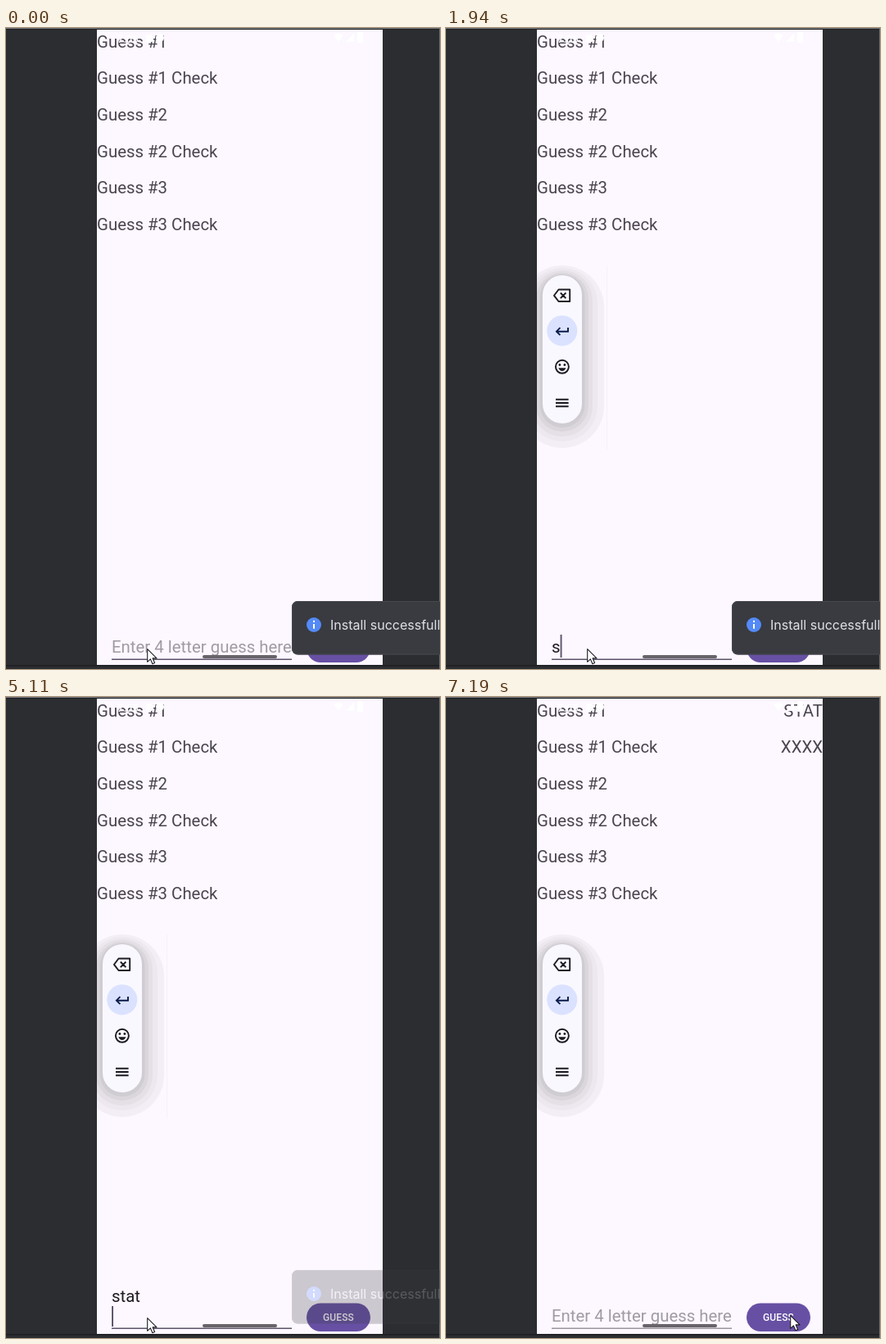
Animation of 530 by 783 pixels, one loop 8000 ms. Source, as an HTML page:

```html
<!DOCTYPE html>
<html lang="en">
<head>
<meta charset="utf-8">
<title>Guessing game</title>
<style>
  html, body { margin: 0; width: 100%; height: 100%; overflow: hidden; background: #2b2d30; }
  svg { display: block; width: 530px; height: 783px; }
  text { font-family: Roboto, sans-serif; font-size: 20.4px; white-space: pre; }
  .label { fill: #49454f; }
  .end { text-anchor: end; }
  .line { fill: none; stroke-width: 1.9; stroke: #1b1b21; }

  /* Every change is a hard cut on one 8 s clock. */
  .anim { animation: 8s step-end infinite; }

  #toolbar { opacity: 0; animation-name: toolbar; }
  @keyframes toolbar {
    5.125% { opacity: .3; transform: translateY(10px); }
    6.75% { opacity: .6; transform: translateY(5px); }
    8.625% { opacity: .85; transform: translateY(2px); }
    10.125%, 100% { opacity: 1; transform: none; }
  }

  #seam { opacity: 0; animation-name: seam; }
  @keyframes seam { 10.125% { opacity: 1; } 82.875% { opacity: 0; } }

  #hint { animation-name: hint; }
  @keyframes hint { 24.25% { opacity: 0; } 82.875% { opacity: 1; } }

  #typed { animation-name: wrap; }
  @keyframes wrap { 51.5% { transform: translateY(-24px); } 65.625% { transform: none; } }

  .key { fill-opacity: 0; }
  #k1 { animation-name: key1; }
  #k2 { animation-name: key2; }
  #k3 { animation-name: key3; }
  @keyframes key1 { 24.25% { fill-opacity: 1; } 82.875% { fill-opacity: 0; } }
  @keyframes key2 { 25.875% { fill-opacity: 1; } 82.875% { fill-opacity: 0; } }
  @keyframes key3 { 29.75% { fill-opacity: 1; } 82.875% { fill-opacity: 0; } }

  #caret { opacity: 0; y: 741px; height: 28px; animation-name: caret; }
  @keyframes caret {
    5.125% { opacity: 1; }
    8.625% { opacity: 0; }
    15.5% { opacity: 1; }
    22.375% { opacity: 0; }
    24.25% { opacity: 1; transform: translateX(10.5px); }
    25.875% { transform: translateX(17px); }
    29.75% { transform: translateX(35px); }
    37% { opacity: 0; }
    42.5% { opacity: 1; }
    48.25% { opacity: 0; }
    51.5% { opacity: 1; transform: none; y: 744px; height: 25px; }
    58.5% { opacity: 0; }
    63.875% { opacity: 1; }
    65.625% { transform: translateX(35px); y: 741px; height: 28px; }
    71.125% { opacity: 0; }
    77.625% { opacity: 1; }
    82.875% { opacity: 0; }
  }

  #underline { stroke: #5b5468; stroke-width: 1.6; animation-name: underline; }
  @keyframes underline { 82.875% { stroke: #99959d; } }

  #notice { animation-name: notice; }
  @keyframes notice { 63.875% { opacity: .25; } 65.625%, 100% { opacity: 0; } }

  #result { opacity: 0; animation-name: result; }
  @keyframes result { 82.875%, 100% { opacity: 1; } }

  #button { fill: #6750a4; animation-name: press; }
  @keyframes press { 82.875% { fill: #7864af; } 89.875% { fill: #6750a4; } }

  #pointer { transform: translate(172px, 758px); animation-name: pointer; }
  @keyframes pointer {
    71.125% { transform: translate(330px, 750px); }
    72.75% { transform: translate(445px, 737px); }
    74.25% { transform: translate(465px, 747px); }
    75.75% { transform: translate(454px, 749px); }
    77.625% { transform: translate(429px, 755px); }
    79.5%, 100% { transform: translate(420px, 755px); }
  }
</style>
</head>
<body>
<svg viewBox="0 0 530 783">
  <defs>
    <clipPath id="screen"><rect x="111" y="2" width="349" height="776"/></clipPath>
  </defs>

  <rect width="530" height="783" fill="#2b2d30"/>
  <rect width="530" height="1" fill="#77787b"/>
  <rect y="1" width="530" height="1" fill="#1e1f22"/>
  <rect y="778" width="530" height="1.5" fill="#1e1f22"/>
  <rect x="529" width="1" height="783" fill="#66686c"/>
  <rect x="111" y="2" width="349" height="776" fill="#fdf7ff"/>

  <g clip-path="url(#screen)">
    <g class="label">
      <text x="111" y="23.6">Guess #1</text>
      <text x="111" y="68.2">Guess #1 Check</text>
      <text x="111" y="112.9">Guess #2</text>
      <text x="111" y="157.5">Guess #2 Check</text>
      <text x="111" y="202.2">Guess #3</text>
      <text x="111" y="246.8">Guess #3 Check</text>
    </g>
    <g id="result" class="label end anim">
      <text x="460" y="23.6">STAT</text>
      <text x="460" y="68.2">XXXX</text>
    </g>

    <!-- status bar -->
    <g fill="#fff">
      <text x="136" y="17.5" style="font-size:13px;font-weight:500">7:05</text>
      <rect x="171" y="8" width="9" height="9" rx="2"/>
      <circle cx="188" cy="12" r="5"/>
      <path d="M400 9q6-5 12 0l-6 8zM415 17l10-11v11z"/>
      <rect x="429" y="5" width="7" height="13" rx="1.5"/>
    </g>

    <path id="seam" class="anim" d="M196.5 290V515" stroke="#f6f0f8"/>

    <g id="toolbar" class="anim">
      <rect x="91" y="290" width="102" height="223" rx="51" fill="#f3eef5"/>
      <rect x="99" y="293" width="86" height="212" rx="43" fill="#ede8ef"/>
      <rect x="105" y="296" width="74" height="203" rx="37" fill="#e4e0e6"/>
      <rect x="110" y="299" width="64" height="194" rx="32" fill="#dad6dc"/>
      <rect x="114.500" y="301" width="55" height="187" rx="27.500" fill="#cfccd2"/>
      <rect x="118" y="302" width="48" height="181" rx="24" fill="#faf8ff"/>
      <path class="line" stroke-linejoin="round" d="M137.500 319.500H151.200V334H137.500L132 326.800zM139.800 323.500l6.600 6.600m0-6.600l-6.600 6.600"/>
      <circle cx="141.800" cy="369.800" r="18.600" fill="#dae2ff"/>
      <path class="line" style="stroke:#0b1b4a" d="M149 366v4.700H135m4.400-4.500l-4.500 4.500 4.500 4.500"/>
      <circle class="line" cx="141.900" cy="413.800" r="8"/>
      <g fill="#1b1b21">
        <circle cx="138.900" cy="411.500" r="1.400"/>
        <circle cx="144.900" cy="411.500" r="1.400"/>
        <path d="M137.300 415.300h9.200q-1.400 3.700-4.600 3.700t-4.600-3.700z"/>
      </g>
      <path class="line" d="M134 453.700h15.600M134 458h15.600M134 462.300h15.600"/>
    </g>

    <text id="hint" class="anim" x="129" y="763.200" fill="#9f9ba3">Enter 4 letter guess here</text>
    <text id="typed" class="anim" x="129" y="763.200" fill="#1d1b20"><tspan id="k1" class="key anim">s</tspan><tspan id="k2" class="key anim">t</tspan><tspan id="k3" class="key anim">at</tspan></text>
    <path id="underline" class="anim" d="M129 771.200H349"/>
    <rect id="caret" class="anim" x="129.200" width="1.800" fill="#4e4860"/>

    <rect id="button" class="anim" x="367" y="740.500" width="78" height="34.500" rx="17.250"/>
    <text x="406" y="762.300" fill="#fff" text-anchor="middle" style="font-size:12px;font-weight:500;letter-spacing:.1px">GUESS</text>
    <rect x="240" y="766" width="91" height="4" rx="2" fill="#68646b"/>
  </g>

  <g id="notice" class="anim">
    <rect x="349" y="700" width="200" height="65.500" rx="7" fill="#393b40"/>
    <rect x="349.500" y="700.500" width="199" height="64.500" rx="7" fill="none" stroke="#46484d"/>
    <circle cx="376" cy="729" r="9" fill="#548af7"/>
    <path d="M376 728v5.800M376 723.800v2.100" stroke="#fff" stroke-width="2"/>
    <text x="396" y="735" fill="#dfe1e5" style="font-family:Inter,sans-serif;font-size:16px">Install successfully</text>
  </g>

  <path id="pointer" class="anim" d="M.7.700V16.300L4.400 12.900 6.900 18.700 9.600 17.500 7.100 11.900H12z" fill="#fff" stroke="#1c1c20" stroke-width="1.100" stroke-linejoin="round"/>
</svg>
</body>
</html>
```
